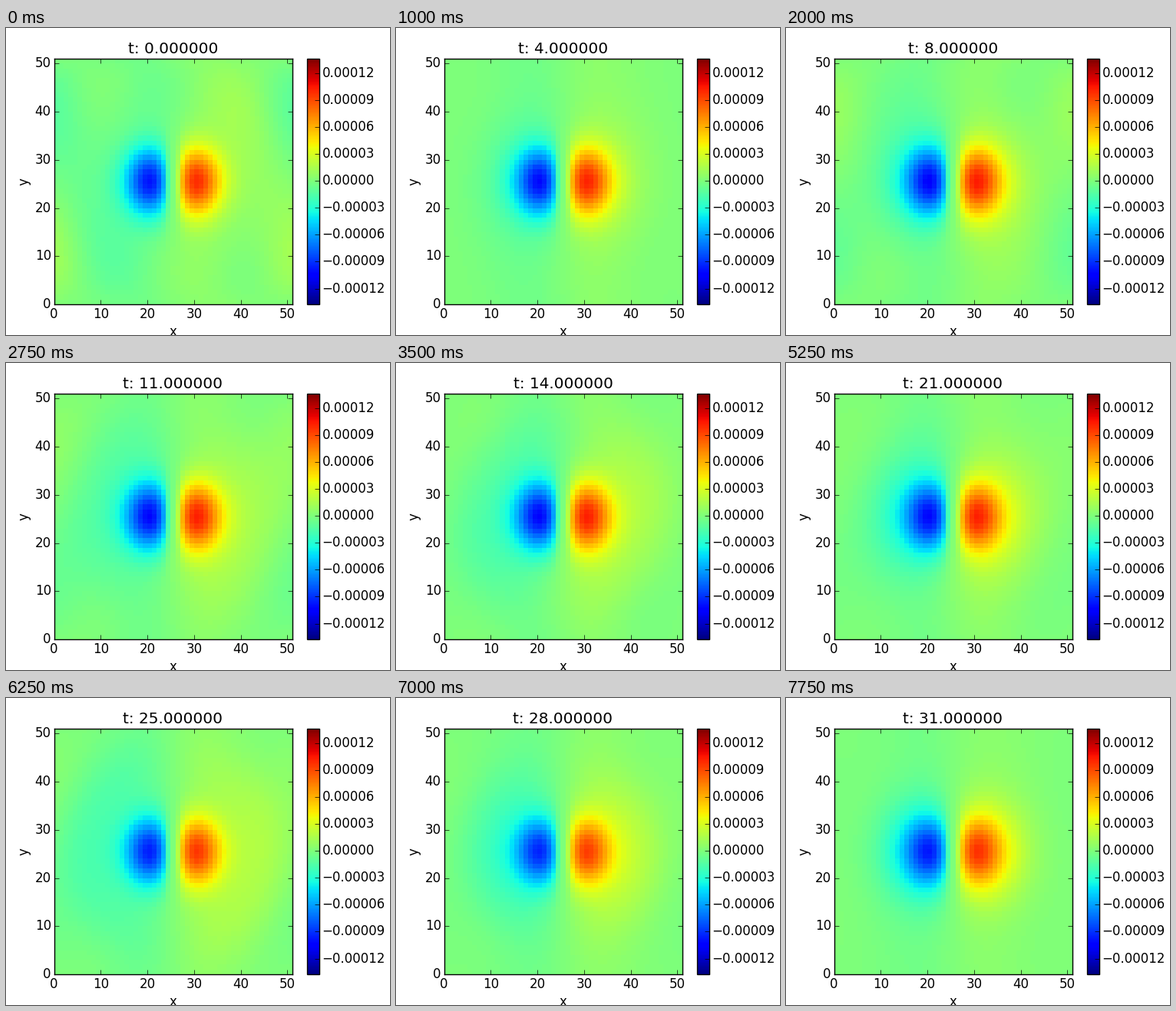
Recreate the animation shown at these times as a matplotlib script. Size 500x400 px, loop 8000 ms.

```python
import matplotlib.pyplot as plt
import numpy as np
from matplotlib.animation import FuncAnimation

plt.style.use("classic")
plt.rcParams["font.family"] = "DejaVu Sans"
plt.rcParams["xtick.major.pad"] = 2.7
plt.rcParams["ytick.major.pad"] = 2.7

N = 51
STEPS = 32
INTERVAL = 250
VMIN, VMAX = -1.375e-4, 1.360e-4

dx, dy = np.meshgrid(np.arange(N) - 25.0, np.arange(N) - 25.0)
r = np.hypot(dx, dy)
kx, ky = 2 * np.pi * dx / N, 2 * np.pi * dy / N


def lobe(u, width):
    """Gaussian derivative with unit peaks at +-width."""
    return u / width * np.exp(0.5 - u**2 / (2 * width**2))


# The core is weaker in the columns next to the centre line
core = lobe(dx, 5) * np.exp(-dy**2 / 50) * np.where(np.abs(dx) <= 1, 0.6, 1)
stripe = lobe(dx, 8)
corner = -np.cos(2 * kx) * np.sin(ky) * (r / 36)**2
tilt = np.sin(kx - ky)
cos_angle = dx / np.maximum(r, 1)


def field(t):
    """Static dipole plus a breathing ring and damped box modes."""
    age = t / (STEPS - 1)
    swell = np.sin(np.pi * age)
    radius = 15 + 4 * np.cos(2 * np.pi * t / 12.5)
    ring = cos_angle * np.exp(-(r - radius)**2 / 50)
    ripple = np.cos(2 * np.pi * t / 17) * np.exp(-t / 16)
    return 1e-5 * ((9.5 - age**3) * core
                   + (0.6 + 1.2 * age**2) * ring
                   + (0.4 + 0.3 * swell) * stripe
                   + 0.4 * swell**2 * tilt
                   + 1.8 * ripple * corner)


fig = plt.figure(figsize=(5, 4), dpi=100, facecolor="white")
ax = fig.add_axes([0.125, 0.1, 0.62, 0.8])
edges = np.arange(N + 1)
mesh = ax.pcolormesh(edges, edges, field(0), cmap="jet", vmin=VMIN, vmax=VMAX)
ax.set_xlim(0, N)
ax.set_ylim(0, N)
ax.set_xticks(range(0, N, 10))
ax.set_yticks(range(0, N, 10))
ax.set_xlabel("x", labelpad=4)
ax.set_ylabel("y", labelpad=4)
title = ax.set_title("t: 0.000000")

cax = fig.add_axes([0.78375, 0.1, 0.032, 0.8])
levels = np.arange(-4, 5) * 3e-5
bar = fig.colorbar(mesh, cax=cax, ticks=levels)
bar.ax.set_yticks(levels, [f"{v:.5f}".replace("-", "\u2212") for v in levels])


def update(i):
    mesh.set_array(field(i))
    title.set_text(f"t: {i:.6f}")
    return mesh, title


anim = FuncAnimation(fig, update, frames=STEPS, interval=INTERVAL,
                     repeat=True, repeat_delay=0, blit=False)
plt.show()
```
